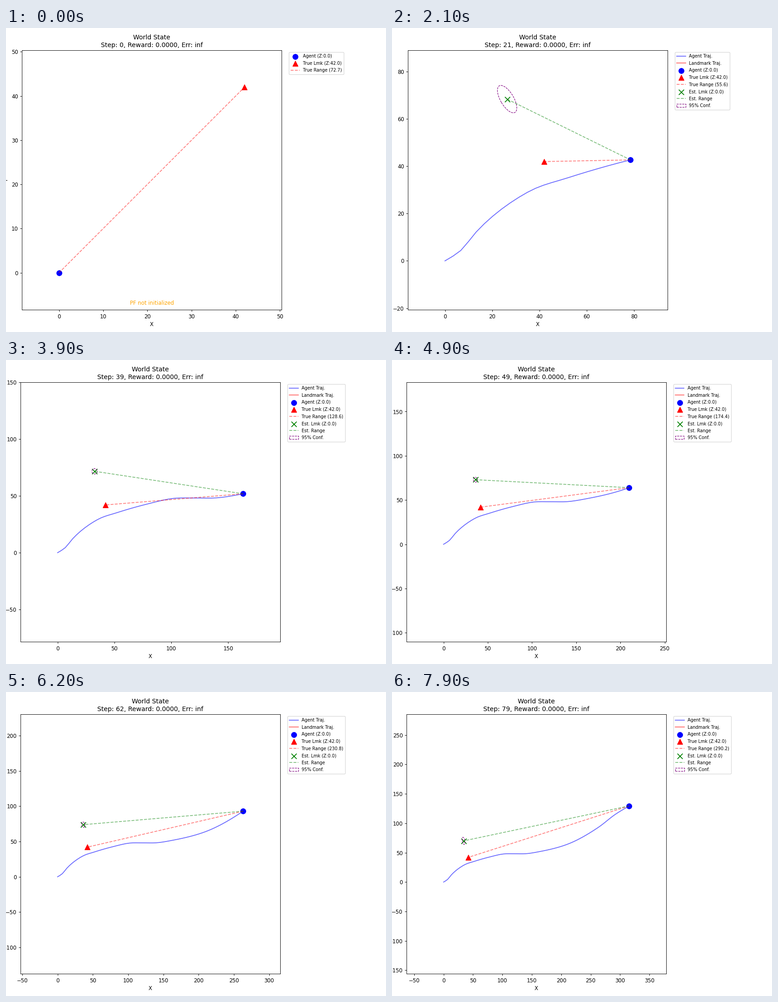
A matplotlib script that plays this animation: 837x669 px, repeating every 8 s.

```python
import numpy as np
import matplotlib.pyplot as plt
from matplotlib.animation import FuncAnimation
from matplotlib.patches import Ellipse

W, H, DPI = 837, 669, 83.7
STEPS, INTERVAL = 80, 100
BOX_W, BOX_H, BOTTOM = 572.2, 571.9, 48.55
CENTER = 389.5  # middle of axes and legend together
LANDMARK = np.array([42.0, 42.0, 42.0])

plt.rcParams["font.family"] = "DejaVu Sans"

# Waypoints: step, x, y
AGENT = np.array([
    (0, 0, 0), (2, 6.7, 4.4), (4, 13.2, 12.2), (10, 34.9, 29), (15, 52.2, 35.2),
    (21, 78.5, 42.7), (26, 102.2, 47.8), (30, 121, 48.1), (34, 139.7, 48.2),
    (39, 163.2, 51.8), (49, 209.8, 64), (62, 263.1, 93), (70, 290, 113.7),
    (79, 315.5, 129.4),
])
ESTIMATE = np.array([
    (0, 41.7, 42.2), (10, 40.5, 43.4), (15, 30, 61.5), (21, 26.3, 68.4),
    (30, 29.4, 70.3), (49, 36, 73), (62, 36.4, 73.9), (79, 34, 70),
])


def smooth(t, knots, values):
    """Cubic Hermite curve through the knots."""
    slope = np.gradient(values, knots)
    i = np.clip(np.searchsorted(knots, t, side="right") - 1, 0, len(knots) - 2)
    h = knots[i + 1] - knots[i]
    u = (t - knots[i]) / h
    return ((1 + 2 * u) * (1 - u) ** 2 * values[i] + u * (1 - u) ** 2 * h * slope[i]
            + u * u * (3 - 2 * u) * values[i + 1] + u * u * (u - 1) * h * slope[i + 1])


def along(waypoints, curve):
    knots, *coords = waypoints.T
    return np.column_stack([curve(np.arange(STEPS), knots, c) for c in coords])


path = along(AGENT, smooth)
guess = along(ESTIMATE, np.interp)


def spread(step):
    """Confidence ellipse: it shrinks and turns upright, then slowly stretches."""
    growth = max(step - 30, 0) / 49
    major = 2.3 + 10.5 * np.exp(-(step / 21.5) ** 4) + 3.9 * growth ** 2
    minor = 2.2 + 3.4 * np.exp(-step / 12)
    angle = -80 + 36 * np.exp(-(step / 28) ** 2)
    return major, minor, angle


fig = plt.figure(figsize=((W + 0.01) / DPI, (H + 0.01) / DPI), dpi=DPI)
ax = fig.add_axes((0.04, BOTTOM / H, BOX_W / W, BOX_H / H))


def range_line(a, b, color, label):
    ax.plot([a[0], b[0]], [a[1], b[1]], color=color, ls="--", alpha=0.5, label=label)


def set_limits(points):
    low, high = points.min(axis=0), points.max(axis=0)
    mid, half = (low + high) / 2, 0.7 * (high - low).max()
    ax.set_xlim(mid[0] - half, mid[0] + half)
    ax.set_ylim(mid[1] - half, mid[1] + half)


def place_axes(legend):
    group = BOX_W * 1.02 + 4.84 + legend.get_window_extent().width
    ax.set_position(((CENTER - group / 2) / W, BOTTOM / H, BOX_W / W, BOX_H / H))


def draw(step):
    ax.clear()
    trail, agent, mark = path[:step + 1], path[step], LANDMARK[:2]
    points = [trail, [mark]]

    if step:
        ax.plot(*trail.T, "b-", alpha=0.6, label="Agent Traj.")
        ax.plot([mark[0]] * 2, [mark[1]] * 2, "r-", alpha=0.6, label="Landmark Traj.")
    ax.scatter(*agent, c="blue", s=100, label="Agent (Z:0.0)")
    ax.scatter(*mark, c="red", s=100, marker="^", label=f"True Lmk (Z:{LANDMARK[2]:.1f})")
    dist = np.linalg.norm(LANDMARK - [*agent, 0])
    range_line(agent, mark, "red", f"True Range ({dist:.1f})")

    if step:
        est = guess[step]
        major, minor, angle = spread(step)
        points.append([est])
        ax.scatter(*est, c="green", s=100, marker="x", label="Est. Lmk (Z:0.0)")
        range_line(agent, est, "green", "Est. Range")
        ax.add_patch(Ellipse(est, 2 * major, 2 * minor, angle=angle, fill=False,
                             ec="purple", ls="--", label="95% Conf."))
    else:
        ax.text(0.5, 0.02, "PF not initialized", color="orange", ha="center",
                transform=ax.transAxes)

    set_limits(np.vstack(points))
    ax.set_xlabel("X")
    ax.set_ylabel("Y")
    ax.set_title(f"World State\nStep: {step}, Reward: 0.0000, Err: inf")
    place_axes(ax.legend(loc="upper left", bbox_to_anchor=(1.02, 1),
                         fontsize="small", labelspacing=0.575))


anim = FuncAnimation(fig, draw, frames=STEPS, interval=INTERVAL, repeat=True,
                     repeat_delay=0, init_func=lambda: None)
plt.show()
```
